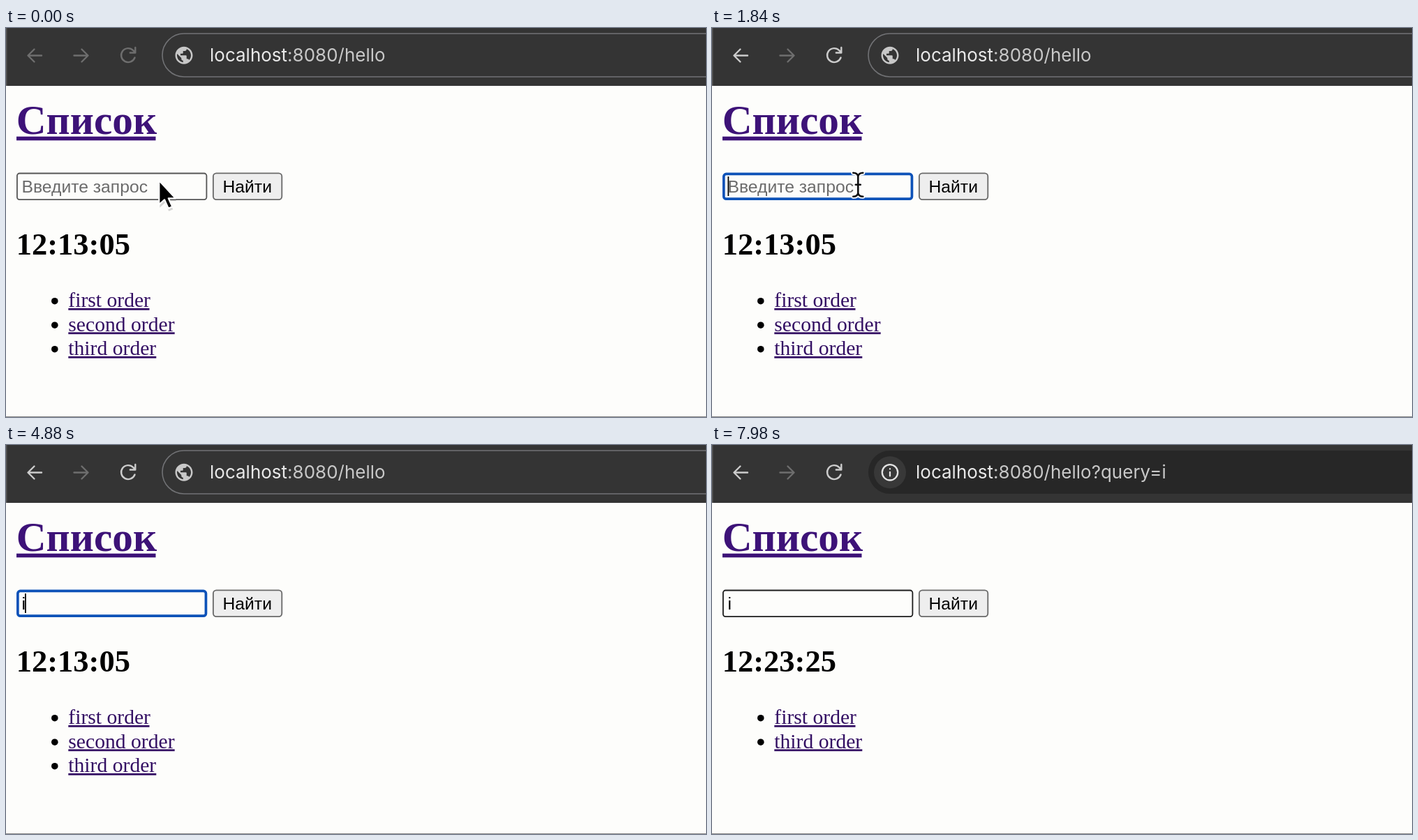
An HTML page for the animation above (8 s loop, 1003 by 558 pixels).

```html
<!DOCTYPE html>
<html lang="ru">
<head>
<meta charset="utf-8">
<title>Список</title>
<style>
  html, body { margin: 0; width: 100%; height: 100%; overflow: hidden; background: #fdfdfb; }
  svg { display: block; width: 1003px; height: 558px; }
  .line { fill: none; stroke-linecap: round; stroke-linejoin: round; }
  .url { font: 26px Inter, Roboto, sans-serif; fill: #c8c8c8; }
  .host { fill: #e8e8e8; }
  .serif { font-family: "Liberation Serif", "Times New Roman", serif; }
  .bold { font-weight: 700; }
  .form { font: 24.7px "Liberation Sans", Arial, sans-serif; }
  .item { font-size: 29.65px; }
  .link { fill: #330f63; }
  .title { fill: #3d1278; }
</style>
</head>
<body>
<svg viewBox="0 0 1003 558" xmlns="http://www.w3.org/2000/svg">
  <rect width="1003" height="558" fill="#fdfdfb"/>
  <rect y="557" width="1003" height="1" fill="#8a8a8a"/>

  <!-- toolbar -->
  <rect width="1003" height="83" fill="#343434"/>
  <rect width="1.5" height="83" fill="#545454"/>
  <g class="line" stroke-width="2.4">
    <path id="back" d="M51 39.5H32M40.5 30.5L31.5 39.5L40.5 48.5"/>
    <path stroke="#6e6e6e" d="M97.5 39.5H117M108.5 30.5L117.5 39.5L108.5 48.5"/>
    <path id="reload" d="M184.5 42.5A10 10 0 1 1 182.3 32.2L185 35M185.3 28V35.5H177.8"/>
  </g>
  <rect id="pill" x="224" y="8" width="1100" height="62" rx="31"/>
  <path id="globe" fill="#c8c8c8" fill-rule="evenodd" transform="translate(240 24.3) scale(1.25)"
    d="M12 2C6.48 2 2 6.48 2 12s4.48 10 10 10 10-4.48 10-10S17.52 2 12 2zm-1 17.93c-3.95-.49-7-3.85-7-7.93 0-.62.08-1.21.21-1.79L9 15v1c0 1.1.9 2 2 2v1.93zm6.9-2.54c-.26-.81-1-1.39-1.9-1.39h-1v-3c0-.55-.45-1-1-1H8v-2h2c.55 0 1-.45 1-1V7h2c1.1 0 2-.9 2-2v-.41c2.93 1.19 5 4.06 5 7.41 0 2.08-.8 3.97-2.1 5.39z"/>
  <g id="info">
    <circle cx="255" cy="39.3" r="23" fill="#383838"/>
    <g class="line" stroke="#e3e3e3" stroke-width="2.3">
      <circle cx="255" cy="39.3" r="11.2"/>
      <path d="M255 38.8V44.4M255 34.2V34.4"/>
    </g>
  </g>
  <text class="url" x="292" y="48.3"><tspan class="host">localhost</tspan>:8080/hello<tspan id="query"></tspan></text>
  <rect id="urlCaret" x="545.5" y="24" width="1.8" height="30" fill="#e3e3e3"/>

  <!-- page -->
  <text class="serif bold title" x="14.8" y="152" font-size="59.3">Список</text>
  <rect class="title" x="15" y="155.7" width="199.5" height="5.6"/>

  <rect id="field" rx="3.5" fill="#fdfdfb"/>
  <text id="value" class="form" x="22.5" y="235.5"></text>
  <rect id="caret" y="213" width="1.8" height="28" fill="#000"/>
  <rect x="296.9" y="208.4" width="98.4" height="37.7" rx="4.5" fill="#eeeeee" stroke="#696969" stroke-width="1.8"/>
  <text class="form" x="310.5" y="235.5">Найти</text>

  <text id="clock" class="serif bold" x="14.8" y="325" font-size="44.5"></text>
  <g id="list"></g>

  <!-- pointers -->
  <g id="arrow">
    <path d="M1 3V39L8.5 32L14 44L20 41.5L14.5 29.5H25Z" fill="#000" opacity=".16"/>
    <path d="M0 0V34.5L7.8 27.5L13.4 40L19 37.5L13.5 25.5H23.5Z" fill="#000" stroke="#fff" stroke-width="2.2" stroke-linejoin="round"/>
  </g>
  <g id="beam" class="line">
    <path id="beamShape" stroke="#fff" stroke-width="6" d="M-7 -17Q-1 -17 0 -12Q1 -17 7 -17M0 -12V12M-7 17Q-1 17 0 12Q1 17 7 17M-3.5 0H3.5"/>
  </g>
</svg>
<script>
const LOOP = 8000;
const AT = { activate: 220, move: 1120, hover: 1260, click: 1400, type: 4460, submit: 6900 };
const $ = id => document.getElementById(id);
const set = (id, attrs) => { for (const k in attrs) $(id).setAttribute(k, attrs[k]); };
const show = (id, on) => set(id, { display: on ? "inline" : "none" });
const blink = (t, from) => t >= from && (t - from) % 1000 < 500;

// Dark stroke on top of the white outline.
const ink = $("beamShape").cloneNode();
ink.id = "beamInk";
$("beam").append(ink);
set("beamInk", { stroke: "#111", "stroke-width": 2.6 });

const orders = [["first", 116.2], ["second", 152.4], ["third", 126]];
const listMarkup = rows => rows.map(([name, width], i) => {
  const y = 400 + i * 34.5;
  return `<circle cx="69.8" cy="${y - 8.3}" r="4.8"/>
    <text class="serif item link" x="89.3" y="${y}">${name} order</text>
    <rect class="link" x="89.3" y="${y + 1.9}" width="${width}" height="2.8"/>`;
}).join("");

let shownList = null;
function drawList(done) {
  if (done === shownList) return;
  shownList = done;
  $("list").innerHTML = listMarkup(done ? orders.filter(([name]) => name.includes("i")) : orders);
}

// The border grows inward from a fixed outer edge.
function drawField(stroke, w) {
  set("field", {
    x: 15 + w / 2, y: 207.6 + w / 2, width: 273.3 - w, height: 39.4 - w,
    stroke, "stroke-width": w
  });
}

function draw(t) {
  const active = t >= AT.activate;
  const clicked = t >= AT.click;
  const typed = t >= AT.type;
  const done = t >= AT.submit;
  const urlFocus = active && !clicked;
  const focus = clicked && !done;

  for (const id of ["back", "reload"]) set(id, { stroke: active ? "#cccccc" : "#6e6e6e" });
  set("pill", {
    fill: done ? "#272727" : "#343434",
    stroke: done ? "none" : urlFocus ? "#5b92e8" : "#717275",
    "stroke-width": urlFocus ? 3.8 : 1.6
  });
  show("globe", !done);
  show("info", done);
  $("query").textContent = done ? "?query=i" : "";
  show("urlCaret", urlFocus && blink(t, AT.activate));

  drawField(focus ? "#0d52b8" : done ? "#1c1c1c" : "#555", focus ? 3.7 : 1.8);
  $("value").textContent = typed ? "i" : "Введите запрос";
  set("value", { fill: typed ? "#000" : "#6b6b6b" });
  set("caret", { x: typed ? 27 : 22.5 });
  show("caret", focus && blink(t, typed ? AT.type : AT.click));

  $("clock").textContent = done ? "12:23:25" : "12:13:05";
  drawList(done);

  const p = Math.min(1, Math.max(0, (t - AT.move) / (AT.click - AT.move)));
  const ease = p * p * (3 - 2 * p);
  const place = `translate(${219.3 - 10 * ease} ${218.8 + 6 * ease})`;
  set("arrow", { transform: place });
  set("beam", { transform: place });
  show("arrow", t < AT.hover);
  show("beam", t >= AT.hover && !typed);
}

const start = performance.now();
function tick() {
  draw((performance.now() - start) % LOOP);
  requestAnimationFrame(tick);
}
tick();
</script>
</body>
</html>
```
